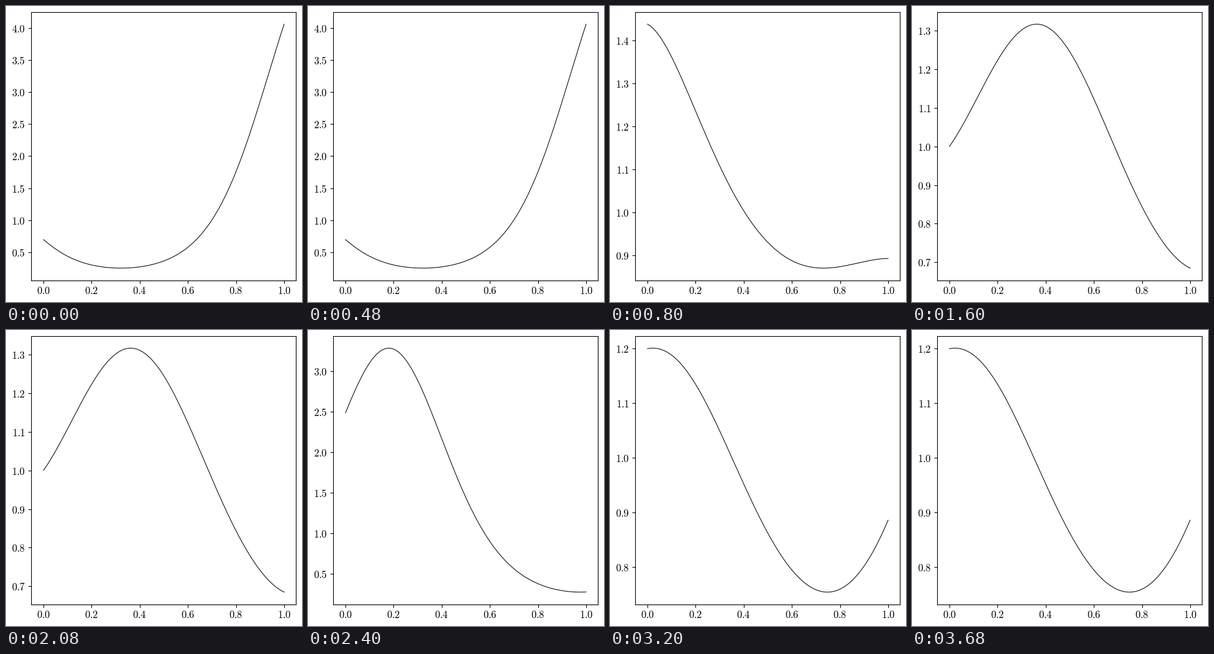
A matplotlib script for the animation above (4000 ms loop, 482 by 482 pixels).

```python
import numpy as np
import matplotlib.pyplot as plt
from matplotlib.animation import FuncAnimation
from matplotlib.ticker import FuncFormatter

SIZE, DPI = 482, 100

plt.rcParams.update({
    "mathtext.fontset": "cm",
    "font.size": 12,
    "axes.linewidth": 0.8,
    "xtick.major.pad": 2.8,
})

# Key heights of each positive random curve, evenly spaced over x = 0..1
KEYS = [
    (0.697, 0.301, 0.271, 0.577, 1.756, 4.060),
    (1.438, 1.236, 1.004, 0.888, 0.874, 0.893),
    (1.000, 1.223, 1.311, 1.123, 0.844, 0.685),
    (2.485, 3.273, 2.167, 0.896, 0.374, 0.272),
    (1.199, 1.134, 0.952, 0.795, 0.760, 0.886),
]

x = np.linspace(0, 1, 400)


def curve(keys):
    """Exponential of the polynomial through the logarithms of the keys."""
    knots = np.linspace(0, 1, len(keys))
    return np.exp(np.polyval(np.polyfit(knots, np.log(keys), len(keys) - 1), x))


fig = plt.figure(figsize=(SIZE / DPI, SIZE / DPI), dpi=DPI, facecolor="white")
ax = fig.add_axes([41.4 / SIZE, 35.3 / SIZE, 431.08 / SIZE, 437 / SIZE])
for axis in (ax.xaxis, ax.yaxis):
    axis.set_major_formatter(FuncFormatter(lambda v, _: f"${v:.1f}$"))
line, = ax.plot(x, curve(KEYS[0]), color="black", lw=0.75)


def draw(i):
    line.set_ydata(curve(KEYS[i]))
    ax.relim()
    ax.autoscale_view()
    return line,


anim = FuncAnimation(fig, draw, frames=len(KEYS), interval=800,
                     repeat=True, repeat_delay=0, blit=False)
plt.show()
```
